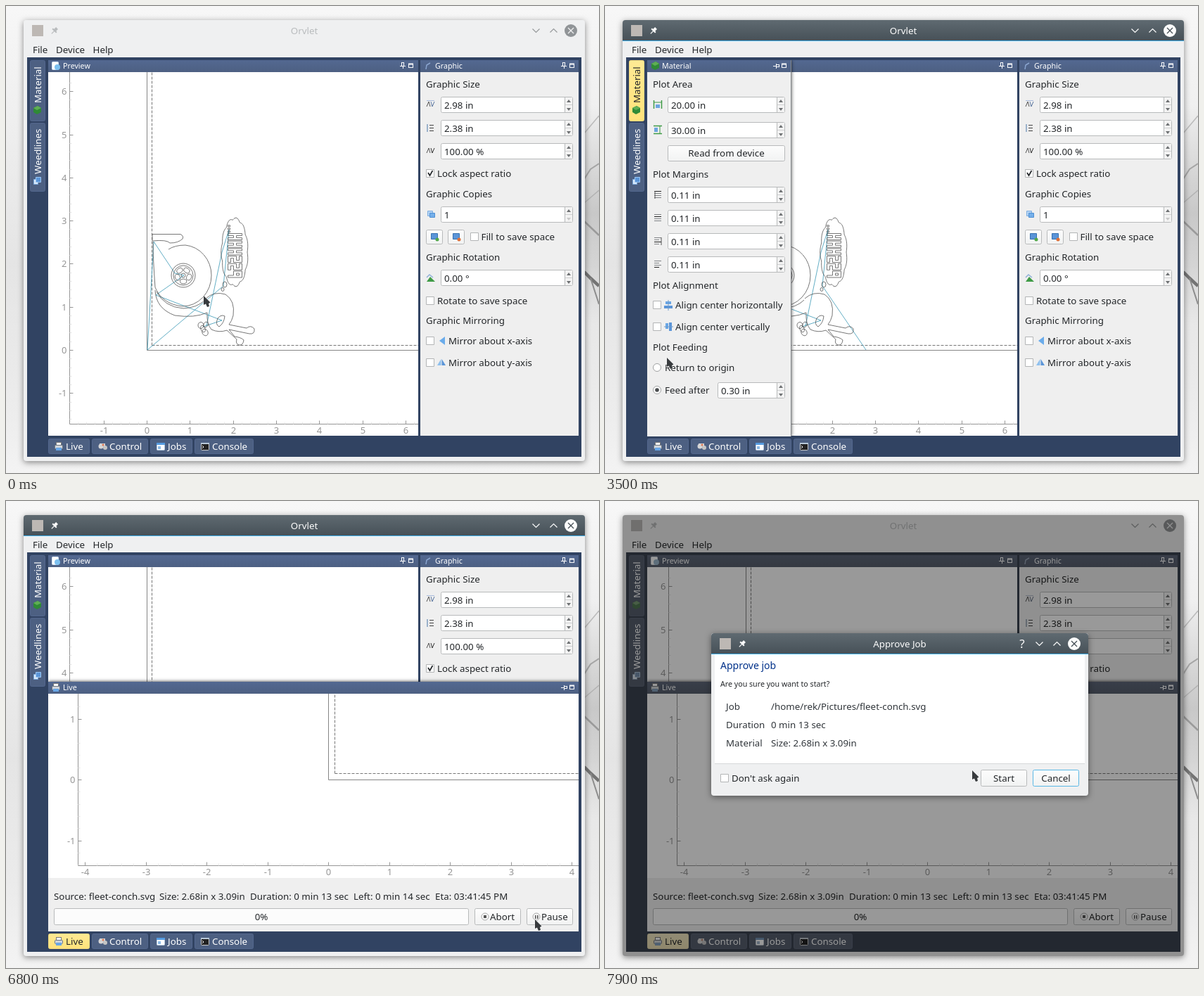
Recreate the animation shown at these times as an HTML page with a canvas. Size 843 by 664 pixels, loop 8000 ms.

```html
<!DOCTYPE html>
<html lang="en">
<head>
<meta charset="utf-8">
<title>Cutter window</title>
<style>
html, body { margin: 0; width: 843px; height: 664px; overflow: hidden; }
canvas { display: block; }
</style>
</head>
<body>
<canvas id="stage" width="843" height="664"></canvas>
<script>
const main = document.getElementById('stage').getContext('2d');
const sheet = main.canvas.cloneNode().getContext('2d');
let c = main;
const LOOP = 8000, STEP = 100;
const INK = '#232629', NAVY = '#314362', BAR = '#4d6082', PANEL = '#efefef', FRAME = '#eff0f1';
const EDGE = '#b8babb', AXIS = '#969696', BLUE = '#5b95d8', GREEN = '#3f9b46', TEAL = '#3a98b5';
const APP = 'Orvlet', FILE = 'fleet-conch.svg';

const ramp = (t, a, b) => Math.max(0, Math.min(1, (t - a) / (b - a)));
const ease = (t, a, b) => { const p = ramp(t, a, b); return p * p * (3 - 2 * p); };
const snap = v => Math.round(v - 0.5) + 0.5;

function layer(fn) { c.save(); fn(); c.restore(); }
function text(s, x, cy, color = INK, size = 13.33, align = 'left') {
  c.font = size + 'px "Noto Sans", "Open Sans", sans-serif';
  c.textAlign = align;
  c.fillStyle = color;
  c.fillText(s, x, Math.round(cy + size * 0.36));
}
function rect(x, y, w, h, fill) { c.fillStyle = fill; c.fillRect(x, y, w, h); }
function box(x, y, w, h, fill, edge, r = 2) {
  c.beginPath();
  c.roundRect(x + 0.5, y + 0.5, w - 1, h - 1, r);
  if (fill) { c.fillStyle = fill; c.fill(); }
  if (edge) { c.strokeStyle = edge; c.lineWidth = 1; c.stroke(); }
}
function line(pts, color, w = 1, dash = []) {
  c.beginPath();
  for (let i = 0; i < pts.length; i += 2) c.lineTo(pts[i], pts[i + 1]);
  c.strokeStyle = color; c.lineWidth = w;
  c.setLineDash(dash); c.stroke(); c.setLineDash([]);
}
function poly(pts, fill) {
  c.beginPath();
  for (let i = 0; i < pts.length; i += 2) c.lineTo(pts[i], pts[i + 1]);
  c.fillStyle = fill; c.fill();
}
function disc(x, y, r, fill, edge) {
  c.beginPath(); c.arc(x, y, r, 0, 7);
  if (fill) { c.fillStyle = fill; c.fill(); }
  if (edge) { c.strokeStyle = edge; c.lineWidth = 1; c.stroke(); }
}
function shade(y0, y1, a, b) {
  const g = c.createLinearGradient(0, y0, 0, y1);
  g.addColorStop(0, a); g.addColorStop(1, b);
  return g;
}

// Widgets
function spin(x, cy, w, value, atMin) {
  const y = cy - 12, r = x + w;
  box(x, y, w, 23, '#fff', EDGE);
  rect(r - 12, y + 1, 11, 21, '#f3f3f3');
  line([r - 11.5, y + 1, r - 11.5, y + 22], EDGE);
  line([r - 11, y + 11.5, r - 1, y + 11.5], '#cfd0d1');
  poly([r - 9, cy - 4, r - 3, cy - 4, r - 6, cy - 8], '#6d7072');
  poly([r - 9, cy + 4, r - 3, cy + 4, r - 6, cy + 8], atMin ? '#c8c8c8' : '#6d7072');
  text(value, x + 5, cy);
}
function check(x, cy, label, lx, on) {
  box(x, cy - 6, 12, 12, '#fff', '#b3b5b6', 0);
  if (on) line([x + 3, cy - 1, x + 5.5, cy + 3, x + 9.5, cy - 4], INK, 1.7);
  text(label, lx, cy);
}
function radio(cy, label, on) {
  disc(74, cy, 5.5, '#fff', '#9fa1a2');
  if (on) disc(74, cy, 2.8, '#4a4d4f');
  text(label, 85, cy);
}
function button(x, y, w, h, label, lx, edge = EDGE) {
  box(x, y, w, h, shade(y, y + h, '#fdfdfd', '#f1f2f2'), edge);
  if (label) text(label, lx, y + h / 2);
}
function centered(x, y, w, h, label, edge) {
  button(x, y, w, h, '', 0, edge);
  text(label, x + w / 2, y + h / 2, INK, 13.33, 'center');
}
function header(x, y, w, label, right, flat) {
  rect(x, y, w, 17, shade(y, y + 17, '#536891', BAR));
  text(label, x + 21, y + 8, '#fff', 10.67);
  const px = right - 20, cy = y + 8;
  if (flat) {
    line([px - 4, cy + .5, px, cy + .5], '#fff');
    line([px + .5, cy - 3, px + .5, cy + 4], '#fff');
    c.strokeStyle = '#fff'; c.strokeRect(px + .5, cy - 1.5, 4, 3);
  } else {
    c.strokeStyle = '#fff'; c.lineWidth = 1; c.strokeRect(px - 1.5, cy - 4.5, 3, 5);
    line([px - 4, cy + .5, px + 4, cy + .5], '#fff');
    line([px + .5, cy, px + .5, cy + 4], '#fff');
  }
  c.strokeStyle = '#fff'; c.lineWidth = 1;
  c.strokeRect(right - 11.5, cy - 2.5, 6, 5);
  line([right - 12, cy - 2.5, right - 5, cy - 2.5], '#fff', 2);
}

// Small icons
function twoSquares(x, y) {
  box(x, y, 8, 8, '#b4d4f5', '#7dade0', 0);
  box(x + 3, y + 3, 8, 7, '#74afea', '#4f8fd2', 0);
}
function printer(x, y) {
  rect(x + 3, y, 7, 4, '#fff');
  c.strokeStyle = '#777'; c.lineWidth = 1; c.strokeRect(x + 2.5, y + .5, 7, 4);
  box(x, y + 4, 12, 6, '#cfd4da', '#6f7780', 1);
  rect(x + 2, y + 8, 8, 4, '#68a6e6');
}
function rows(x, cy, edge) {
  for (let i = 0; i < 4; i++) {
    const short = edge > 1 && i % 2;
    line([x, cy - 4.5 + i * 3, x + (short ? 7 : 10), cy - 4.5 + i * 3], i === edge ? '#222' : '#808387');
  }
  if (edge === 0 || edge === 2) line([x + (edge ? 10 : 1), cy - 5, x + (edge ? 10 : 1), cy + 6], '#555');
}
function rangeIcon(x, cy, turn) {
  layer(() => {
    c.translate(x, cy); c.rotate(turn);
    line([-5.5, -6, -5.5, 6], GREEN, 1.5); line([5.5, -6, 5.5, 6], GREEN, 1.5);
    rect(-3, 0, 6, 5, '#6ca5df'); line([-5, -3, 5, -3], GREEN);
  });
}
function sizeIcon(x, cy, kind) {
  if (kind === 1) {
    for (let i = -4; i <= 4; i += 4) line([x + 4, cy + i + .5, x + 10, cy + i + .5], '#444');
    line([x + 1, cy - 5, x + 1, cy + 6], '#4976a8');
    return;
  }
  line([x, cy + 3, x + 3, cy - 4, x + 5, cy + 3], '#555');
  line([x + 6, cy - 4, x + 8, cy + 3, x + 11, cy - 4], kind ? '#333' : '#5a76a0');
  if (kind === 0) line([x, cy - 5.5, x + 11, cy - 5.5], '#a9bbdc');
}

function backdrop() {
  rect(0, 0, 843, 664, shade(0, 664, '#f7f7f7', '#f3f3f3'));
  const mist = shade(0, 664, 'rgba(225,225,225,0)', 'rgba(225,225,225,0)');
  mist.addColorStop(0.55, 'rgba(222,222,222,.7)');
  mist.addColorStop(0.8, 'rgba(228,228,228,.6)');
  rect(0, 0, 843, 664, mist);
  const haze = shade(140, 450, 'rgba(140,140,140,0)', 'rgba(140,140,140,0)');
  haze.addColorStop(0.5, 'rgba(140,140,140,.35)');
  rect(822, 140, 21, 310, haze);
  line([822, 181, 843, 156], '#bbb', 1.5);
  line([822, 246, 831, 232, 843, 224], '#a5a5a5', 2);
  line([822, 280, 843, 262], '#b2b2b2', 1.5);
  line([822, 306, 843, 326], '#9a9a9a', 2.5);
  line([822, 378, 831, 387, 843, 398], '#747474', 4.5);
  line([831, 387, 843, 424], '#8c8c8c', 2);
}

// Plot area shared by both views
function plot(o) {
  layer(() => {
    c.beginPath(); c.rect(o.x, o.y, o.w, o.h); c.clip();
    rect(o.x, o.y, o.w, o.h, '#fff');
    const right = o.x + o.w, m = 0.109 * o.unit;
    line([o.ax, o.y, o.ax, o.ay, right, o.ay], AXIS);
    for (let i = -30; i <= 40; i++) {
      const v = i / 5, gx = snap(o.ox + v * o.unit), gy = snap(o.oy - v * o.unit), major = i % 5 === 0;
      const col = major ? AXIS : '#e6e6e6', len = major ? 5 : 3;
      if (gy > o.y + 5 && gy < o.ay) line([o.ax, gy, o.ax + len, gy], col);
      if (gx > o.ax && gx < right) line([gx, o.ay, gx, o.ay - len], col);
      if (!major) continue;
      if (gy > o.y + 6 && gy < o.ay - 6) text(v, o.ax - 4, gy, AXIS, 13, 'right');
      if (gx > o.ax && gx < right) text(v, gx, o.ay + 9, AXIS, 13, 'center');
    }
    line([o.ox, o.y, o.ox, o.oy, right, o.oy], '#858585');
    const mx = snap(o.ox + m), my = snap(o.oy - m);
    line([mx, my, mx, o.y], '#777', 1, [4, 2]);
    line([mx, my, right, my], '#777', 1, [4, 2]);
  });
}

const outline = new Path2D(`M208 334V324.500H248Q253 327 251 331Q245 337 233 337Q229 332 208 334
M231 346Q240 340 255 340A41 43 0 0 1 292 383A41 44 0 0 1 251 427Q222 424 212 400Q209 360 209 335
M212 404Q213 430 240 440Q268 444 286 436M214 406Q225 428 252 430Q272 429 283 418
M284 416Q296 405 312 410Q326 419 323 440Q321 448 317 453L342 458Q348 453 353 459Q354 467 346 466
L317 460L325 470Q334 471 338 475Q337 483 331 482Q326 480 328 474L314 461Q303 465 292 460
Q285 452 286 436M303 456Q297 453 301 444Q306 438 311 441Q310 451 303 456`);

// Block letters of the puff of steam
const glyphs = {
  P: new Path2D('M0 0H9V12H3V20H0ZM3 4H6V8H3Z'),
  S: new Path2D('M9 0H0V12H6V16H0V20H9V8H3V4H9Z'),
  H: new Path2D('M0 0H3V8H6V0H9V20H6V12H3V20H0Z'),
  '.': new Path2D('M0 17H2V20H0Z')
};

function oval(x, y, rx, ry, turn = 0) {
  c.beginPath(); c.ellipse(x, y, rx, ry, turn, 0, 7); c.stroke();
}
function snail(feed) {
  const end = feed ? [371, 489] : [201, 489];
  line([201, 489, 210, 335, 240, 380, 253, 383, 213, 411, 307, 447, 280, 456], TEAL, .8);
  line([285, 455, 307, 350, 317, 318, 309, 398, ...end], TEAL, .8);
  c.strokeStyle = '#555'; c.lineWidth = .8;
  c.stroke(outline);
  for (const r of [17, 14, 3]) oval(252, 383, r, r);
  for (let i = 0; i < 5; i++) {
    const a = i * Math.PI * .4 + .3;
    oval(252 + 8.5 * Math.cos(a), 383 + 8.5 * Math.sin(a), 3.4, 4.6, a);
  }
  oval(277, 454, 4, 4.5); oval(284, 453, 3, 4, .5);
  oval(283, 464, 4, 5, -.5); oval(280, 459, 3, 5, -.4);
  c.beginPath();
  for (let i = 0; i <= 120; i++) {
    const a = i / 120 * Math.PI * 2, k = 1 + .07 * Math.abs(Math.sin(a * 5.5));
    c.lineTo(325 + 18 * k * Math.cos(a), 350 + 46 * k * Math.sin(a));
  }
  c.stroke();
  oval(311, 396, 3, 4); oval(308, 403, 2, 2.5);
  layer(() => {
    c.translate(336, 386); c.rotate(-Math.PI / 2); c.scale(1, -1); c.translate(0, 0.5);
    for (const ch of 'PSSHHH...') {
      c.stroke(glyphs[ch]);
      c.translate(ch === '.' ? 4 : 10.7, 0);
    }
  });
}

function preview(t) {
  header(60, 77, 526, 'Preview', 584);
  box(65, 79, 10, 12, '#fff', '#d3e3f5', 1); disc(73, 87, 4, '#7cc0ef');
  plot({ x: 60, y: 94, w: 526, h: 517, ax: 90.5, ay: 594.5, ox: 200.5, oy: 489.5, unit: 61.3 });
  snail(t >= 3100);
}

function graphic() {
  rect(589, 94, 225, 517, PANEL);
  header(589, 77, 225, 'Graphic', 813);
  line([597, 90, 598, 84, 603, 81], '#8aa5cf', 1.5);
  text('Graphic Size', 597, 111);
  ['2.98 in', '2.38 in', '100.00 %'].forEach((v, i) => {
    const cy = 141 + i * 33;
    sizeIcon(598, cy - 1, i); spin(618, cy, 188, v);
  });
  check(597, 238, 'Lock aspect ratio', 613, true);
  text('Graphic Copies', 597, 267);
  twoSquares(599, 291); spin(618, 297, 188, '1', true);
  button(597, 318, 24, 21); button(628, 318, 24, 21);
  box(604, 323, 10, 9, BLUE, '#3671b0', 0); disc(613, 332, 2.5, '#53a84a');
  box(635, 323, 10, 9, BLUE, '#3671b0', 0); disc(644, 332, 2.5, '#de7038');
  check(660, 328, 'Fill to save space', 675.5);
  text('Graphic Rotation', 597, 357);
  poly([598, 392, 610, 392, 603, 385], GREEN); line([598, 386, 602, 382, 607, 386], '#8fb0d8', 1.5);
  spin(618, 387, 188, '0.00 °');
  check(597, 419, 'Rotate to save space', 613);
  text('Graphic Mirroring', 597, 447);
  check(597, 476, 'Mirror about x-axis', 629);
  poly([616, 476, 624, 470, 624, 482], '#6aaceb');
  check(597, 507, 'Mirror about y-axis', 629);
  poly([613, 511, 618.5, 502, 618.5, 511], '#8fc0ee'); poly([619.5, 511, 619.5, 502, 625, 511], BLUE);
}

function cube(x, y) {
  poly([x, y + 3, x + 6, y, x + 11, y + 3, x + 11, y + 9, x + 5, y + 12, x, y + 9], '#2f8a36');
  poly([x, y + 3, x + 6, y, x + 11, y + 3, x + 5, y + 6], '#5fae54');
}
function material(t, p) {
  layer(() => {
    c.beginPath(); c.rect(60, 77, 230, 535); c.clip();
    c.translate(Math.round((p - 1) * 212), 0);
    layer(() => {
      c.shadowColor = 'rgba(0,0,0,.7)'; c.shadowBlur = 5;
      rect(60, 77, 205, 535, PANEL);
    });
    header(60, 77, 205, 'Material', 263, true);
    cube(66, 79);
    line([264.5, 77, 264.5, 612], '#85888c');
    text('Plot Area', 68, 111);
    rangeIcon(75, 140, 0); spin(89, 141, 167, '20.00 in');
    rangeIcon(75, 176, Math.PI / 2); spin(89, 177, 167, '30.00 in');
    centered(89, 198, 167, 23, 'Read from device');
    text('Plot Margins', 68, 239);
    for (let i = 0; i < 4; i++) { rows(70, 268 + i * 33, i); spin(89, 269 + i * 33, 167, '0.11 in'); }
    text('Plot Alignment', 68, 397);
    check(68, 425, 'Align center horizontally', 100);
    check(68, 456, 'Align center vertically', 100);
    rect(86, 420, 8, 4, '#6aa6e5'); rect(84, 426, 12, 4, BLUE); line([90, 418, 90, 433], '#6f9bc8');
    rect(86, 451, 4, 8, '#6aa6e5'); rect(91, 450, 4, 12, BLUE); line([84, 456, 97, 456], '#6f9bc8');
    text('Plot Feeding', 68, 485);
    radio(514, 'Return to origin', t < 3000);
    radio(546, 'Feed after', t >= 3000);
    spin(160, 547, 96, '0.30 in');
  });
}

function live(t, p) {
  const run = t >= 6500;
  layer(() => {
    c.beginPath(); c.rect(60, 240, 754, 372); c.clip();
    c.translate(0, Math.round((1 - p) * 362));
    layer(() => {
      c.shadowColor = 'rgba(0,0,0,.8)'; c.shadowBlur = 5;
      rect(60, 257, 754, 355, PANEL);
    });
    header(60, 257, 754, 'Live', 813, true);
    printer(65, 259);
    plot({ x: 60, y: 274, w: 754, h: 262, ax: 102.5, ay: 518.5, ox: 458.5, oy: 396.5, unit: 86.5 });
    text('Source: ' + FILE, 68, 562);
    text('Size: 2.68in x 3.09in', 218, 562);
    text(`Duration: 0 min ${run ? 13 : 14} sec`, 347, 562);
    text(run ? `Left: 0 min ${t < 7500 ? 14 : 13} sec` : 'Left:', 494, 562);
    text('Eta: ' + (run ? '03:41:45 PM' : '03:40:47 PM'), run ? 610 : 533, 562);
    const w = run ? 590 : 656;
    box(68, 579, w, 24, '#fcfcfc', EDGE);
    if (!run) box(68, 579, 184, 24, shade(579, 603, '#5cc4f8', '#3daee9'), '#3291c4');
    text(run ? '0%' : '28%', 68 + w / 2, 591, INK, 13.33, 'center');
    if (run) {
      button(666, 579, 66, 24, 'Abort', 688);
      disc(681, 591, 5, '#f7f7f7', '#aaa'); rect(679, 589, 4, 4, '#555');
      button(740, 579, 66, 24, 'Pause', 761);
      disc(754, 591, 5, '#f7f7f7', '#aaa'); rect(752, 589, 1.5, 5, '#555'); rect(755, 589, 1.5, 5, '#555');
    } else {
      button(740, 579, 66, 24, 'Start', 764.5);
      disc(757, 591, 5, '#f7f7f7', '#aaa'); poly([756, 588, 760, 591, 756, 594], '#555');
    }
  });
}

const tabFill = (on, y, h) => on ? shade(y, y + h, '#ffea94', '#ffe27a') : BAR;
function sideTab(y, h, label, ty, on) {
  box(34, y, 22, h, tabFill(on, y, h), on ? '#f3d980' : '#53678e');
  layer(() => {
    c.translate(45, ty); c.rotate(-Math.PI / 2);
    text(label, 0, 0, on ? INK : '#fff');
  });
}
function bottomTab(x, w, label, lx, on) {
  box(x, 615, w, 22, tabFill(on, 615, 22), on ? '#f3d980' : '#53678e');
  text(label, lx, 626, on ? INK : '#fff');
}
function tabs(t) {
  sideTab(77, 87, 'Material', 138, t >= 700 && t < 5200);
  cube(39, 142);
  sideTab(166, 98, 'Weedlines', 239, false);
  box(39, 246, 7, 8, '#d9e9fa', '#7aa9dc', 0); box(42, 243, 8, 8, BLUE, '#9cc6f1', 0);
  bottomTab(60, 59, 'Live', 85, t >= 5100);
  bottomTab(122, 80, 'Control', 147);
  bottomTab(205, 60, 'Jobs', 230);
  bottomTab(268, 84, 'Console', 293);
  printer(69, 620);
  disc(135, 626, 3.5, '#d6d6d6'); disc(141, 628, 3, '#c4c4c4'); rect(133, 622, 8, 4, '#d6d6d6'); disc(138, 624, 1.5, '#df7650');
  box(214, 621, 12, 11, '#fff', '#b6c9dd', 1); rect(214, 621, 12, 3, '#559be0'); rect(216, 626, 4, 4, '#8bb9e5');
  box(277, 621, 12, 11, '#222', '#c8c8c8', 1); rect(277, 621, 12, 2, '#b8c8d8'); line([279, 625, 281, 627, 279, 629], '#fff');
}

function titleBar(x, y, w, label, act, help) {
  const paint = on => {
    const fg = on ? '#fcfcfc' : '#b9bcbe', cy = y + 15, r = x + w;
    c.beginPath(); c.roundRect(x, y, w, 30, [4, 4, 0, 0]);
    c.fillStyle = on ? shade(y, y + 30, '#5f6a71', '#465057') : FRAME; c.fill();
    if (on) line([x, y + 29.5, r, y + 29.5], '#3daee9');
    rect(x + 12, cy - 8, 16, 16, '#bdb8b4');
    layer(() => {
      c.translate(x + 44, cy); c.rotate(Math.PI / 4);
      rect(-2, -5, 4, 5, fg); rect(-4, -1, 8, 2, fg); rect(-.5, 0, 1.2, 6, fg);
    });
    text(label, x + w / 2, cy, fg, 13.33, 'center');
    const dim = on ? fg : '#96999b';
    if (help) text('?', r - 94, cy, dim, 17, 'center');
    line([r - 74.5, cy - 2.5, r - 69.5, cy + 2.5, r - 64.5, cy - 2.5], dim, 1.2);
    line([r - 49.5, cy + 2.5, r - 44.5, cy - 2.5, r - 39.5, cy + 2.5], dim, 1.2);
    disc(r - 20, cy, 9, on ? '#fcfcfc' : '#909497');
    const x0 = r - 20, ink = on ? '#475057' : FRAME;
    line([x0 - 4, cy - 4, x0 + 4, cy + 4], ink, 1.3);
    line([x0 + 4, cy - 4, x0 - 4, cy + 4], ink, 1.3);
  };
  paint(false);
  if (act > 0) layer(() => { c.globalAlpha = act; paint(true); });
}
function frame(x, y, w, h) {
  layer(() => {
    c.shadowColor = 'rgba(0,0,0,.45)'; c.shadowBlur = 8; c.shadowOffsetY = 2;
    c.beginPath(); c.roundRect(x, y, w, h, 4);
    c.fillStyle = FRAME; c.fill();
  });
}

function mainWindow(t) {
  frame(25, 20, 798, 627);
  titleBar(25, 20, 798, APP, ramp(t, 1500, 1700) * (1 - ramp(t, 6950, 7085)));
  text('File', 38, 62); text('Device', 71, 62); text('Help', 123.5, 62);
  rect(30, 73, 788, 568, NAVY);
  tabs(t);
  preview(t);
  graphic();
  const m = ease(t, 750, 1000) * (1 - ease(t, 5150, 5400));
  const l = ease(t, 5200, 5480);
  if (m > 0) material(t, m);
  if (l > 0) live(t, l);
  const dark = 0.4 * ramp(t, 6918, 7282);
  if (dark > 0) layer(() => {
    c.beginPath(); c.roundRect(25, 20, 798, 627, 4); c.clip();
    c.globalCompositeOperation = 'saturation';
    rect(25, 20, 798, 627, `rgba(128,128,128,${dark * 1.4})`);
    c.globalCompositeOperation = 'source-over';
    rect(25, 20, 798, 627, `rgba(0,0,0,${dark})`);
  });
}

// Painted on its own sheet so that it fades as one piece
function dialog(t) {
  const a = ramp(t, 6925, 7095);
  if (a <= 0) return;
  c = sheet;
  c.clearRect(0, 0, 843, 664);
  frame(151, 188, 536, 231);
  titleBar(151, 188, 536, 'Approve Job', ramp(t, 6970, 7095), true);
  rect(156, 218, 526, 155, '#fff');
  line([156, 373.5, 682, 373.5], '#d6d8d9');
  text('Approve job', 164, 234, '#00318a', 14);
  text('Are you sure you want to start?', 164, 260, INK, 10.67);
  [['Job', '/home/rek/Pictures/' + FILE], ['Duration', '0 min 13 sec'], ['Material', 'Size: 2.68in x 3.09in']]
    .forEach(([k, v], i) => { text(k, 172, 292 + i * 26, '#31363b'); text(v, 236, 292 + i * 26, '#31363b'); });
  check(164, 394, "Don't ask again", 180);
  centered(534, 382, 66, 24, 'Start');
  centered(608, 382, 66, 24, 'Cancel', '#5ab8e6');
  c = main;
  layer(() => { c.globalAlpha = a; c.drawImage(sheet.canvas, 0, 0); });
}

// Pointer stops: time, x, y
const stops = [
  [0, 281, 412], [200, 274, 402], [500, 140, 225], [800, 45, 125], [1400, 45, 125],
  [1800, 48, 160], [2100, 66, 258], [2300, 86, 410], [2400, 91, 451], [2800, 82, 547],
  [3300, 82, 547], [3500, 88, 500], [3800, 50, 200], [3900, 35, 98], [4000, 37, 120],
  [4200, 54, 293], [4600, 72, 500], [4900, 93, 615], [5500, 93, 615], [6000, 744, 602],
  [6100, 757, 606], [6200, 757, 606], [6400, 752, 595], [7200, 752, 595], [7800, 527, 389],
  [7900, 522, 383], [8000, 522, 383]
];
function pointer(t) {
  const i = t < 200 ? 1 : stops.findIndex(s => s[0] > t), a = stops[i - 1], b = stops[i];
  const p = (t - a[0]) / (b[0] - a[0]);
  layer(() => {
    c.translate(a[1] + (b[1] - a[1]) * p, a[2] + (b[2] - a[2]) * p);
    const arrow = [0, 0, 0, 13, 3, 11.5, 5, 16, 8, 15, 7, 11, 9.5, 9.5, 0, 0];
    line(arrow, 'rgba(255,255,255,.55)', 1.4);
    poly(arrow, '#383b3e');
  });
}

function draw(now) {
  const t = Math.floor((now % LOOP) / STEP) * STEP;
  backdrop();
  mainWindow(t);
  dialog(t);
  pointer(t);
  requestAnimationFrame(draw);
}
requestAnimationFrame(draw);
</script>
</body>
</html>
```
